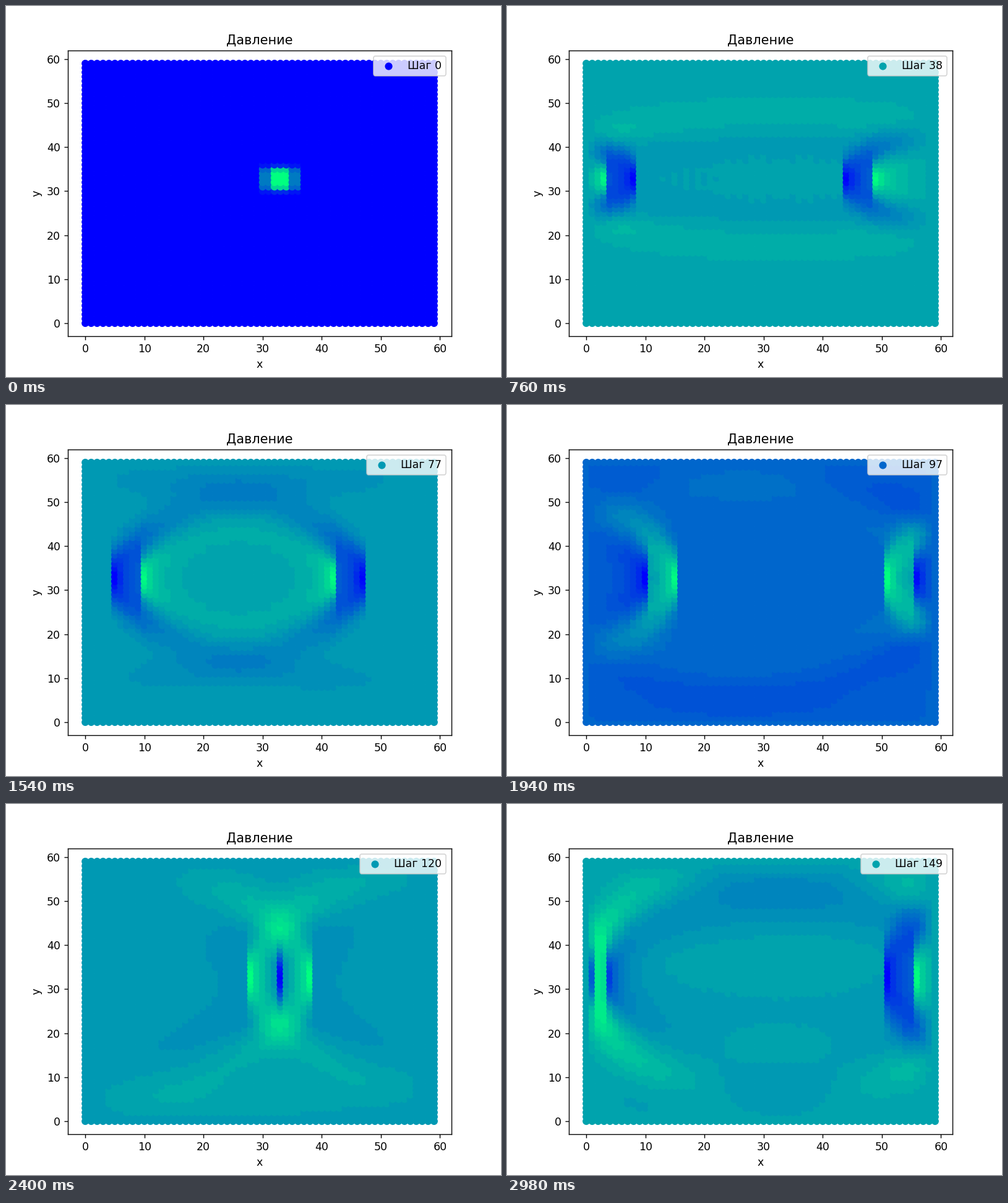
Write a matplotlib script that moves like this. It is 800 px wide and 600 px high and loops after 3 s.

```python
import numpy as np
import matplotlib.pyplot as plt
from matplotlib.animation import FuncAnimation

plt.rcParams["font.family"] = "DejaVu Sans"

N = 60          # grid nodes per side
STEPS = 150
CY = 1 / 3      # Courant number along y (it is 1 along x)
LEVELS = 26     # colour bands


def advect(p, w, c):
    """Upwind step of the Riemann invariants along axis 0, p = 0 at both ends."""
    fwd, back = p + w, p - w
    a, b = fwd.copy(), back.copy()
    a[1:] -= c * (fwd[1:] - fwd[:-1])
    b[:-1] += c * (back[1:] - back[:-1])
    a[0] = -b[0]
    b[-1] = -a[-1]
    return (a + b) / 2, (a - b) / 2


def simulate():
    p, u, v = np.zeros((3, N, N))
    p[31:36, 31:36] = 1
    states = []
    for _ in range(STEPS):
        p, u = advect(p, u, 1.0)
        pt, vt = advect(p.T, v.T, CY)
        p, v = pt.T, vt.T
        states.append(p.ravel())
    return states


def colours(p):
    t = (p - p.min()) / (p.max() - p.min())
    t = np.round(t * (LEVELS - 1)) / (LEVELS - 1)
    return np.column_stack([0 * t, t, 1 - t / 2])


states = simulate()
xs, ys = np.indices((N, N))

fig, ax = plt.subplots(figsize=(6.4, 4.8), dpi=125)
dots = ax.scatter(xs.ravel(), ys.ravel(), c="blue", label="Шаг 0")
ax.set_title("Давление")
ax.set_xlabel("x")
ax.set_ylabel("y")
legend = ax.legend(loc="upper right")
marker = legend.legend_handles[0]
caption = legend.get_texts()[0]


def update(step):
    rgb = colours(states[step])
    dots.set_color(rgb)
    marker.set_color(rgb[:1])
    caption.set_text(f"Шаг {step}")
    return dots, legend


anim = FuncAnimation(fig, update, frames=STEPS, interval=20, repeat=True,
                     repeat_delay=0)
plt.show()
```
